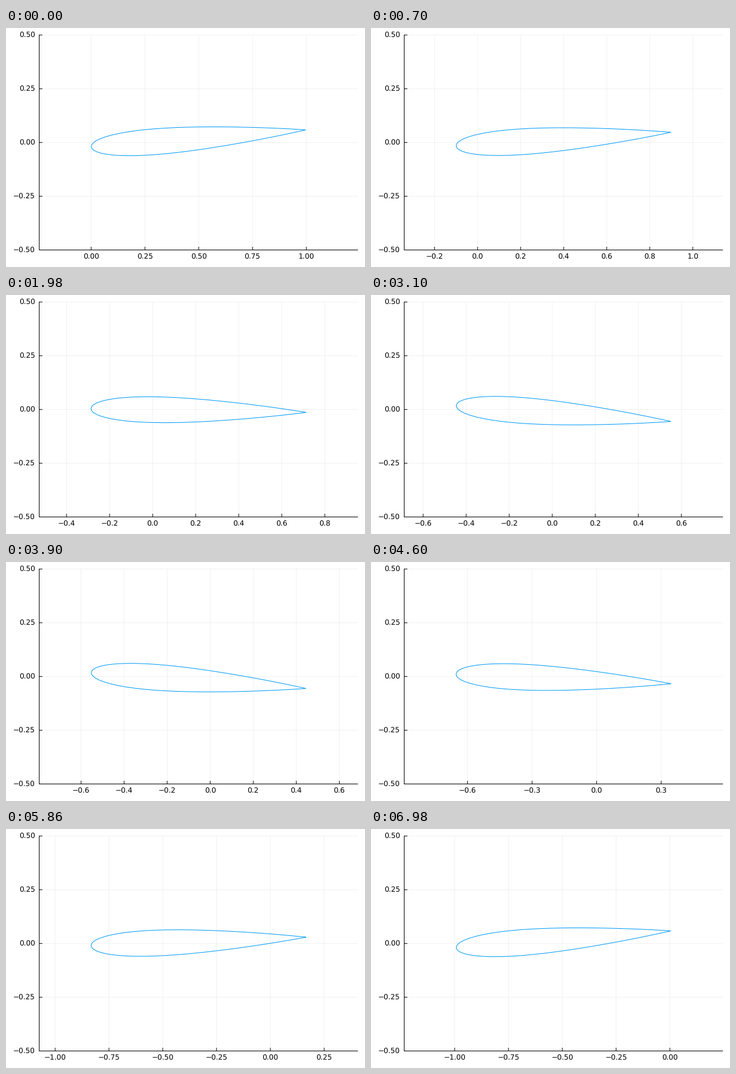
These frames come from a looping animation (600x400 px, 7080 ms). A matplotlib script:

```python
import numpy as np
import matplotlib.pyplot as plt
from matplotlib.animation import FuncAnimation

plt.rcParams["font.family"] = "DejaVu Sans"
plt.rcParams["text.hinting"] = "none"

W, H, DPI = 600, 400, 100
PX = 72 / DPI                                   # one pixel in points
LEFT, RIGHT, TOP, BOTTOM = 55.5, 588.2, 11.8, 371.5
SCALE = BOTTOM - TOP                            # pixels per unit, both axes
MID_X, MID_Y = (LEFT + RIGHT) / 2, (TOP + BOTTOM) / 2
SPAN = (RIGHT - LEFT) / SCALE
TICK = 5.3
FONT = 12 * PX

POSES = 150
PITCH = np.radians(4.5)
PIVOT = 0.25
STEPS = {0.2: (0.7, 1), 0.25: (0.5, 2), 0.3: (0.2, 1)}   # niceness, decimals


def foil(n=30, thick=0.12):
    """Closed symmetric four-digit section with unit chord."""
    x = (1 - np.cos(np.linspace(0, np.pi, n + 1))) / 2
    y = 5 * thick * (0.2969 * np.sqrt(x) - 0.1260 * x - 0.3516 * x**2
                     + 0.2843 * x**3 - 0.1036 * x**4)
    return np.r_[x[::-1], x[1:]], np.r_[y[::-1], -y[1:]]


def ticks_for(lo, hi):
    """Best-scoring round ticks inside the limits, with their decimals."""
    best = None
    for step, (nice, digits) in STEPS.items():
        vals = step * np.arange(np.ceil(lo / step), np.floor(hi / step) + 1)
        n = len(vals)
        if not 4 <= n <= 8:
            continue
        score = ((1 - abs(n - 5) / 5) / 4 + nice / 4
                 + 0.5 * (hi - lo) / ((n - 1) * step))
        if best is None or score > best[0]:
            best = score, vals, digits
    return best[1:]


def label(v, digits):
    text = f"{abs(v):.{digits}f}"
    return "\u2212" + text if v < -1e-9 else text


def line(xs, ys, color="black", **kw):
    kw = {"lw": PX, "solid_capstyle": "butt", "snap": False, **kw}
    return ax.plot(xs, ys, color=color, **kw)[0]


def grid_line(xs, ys):
    return line(xs, ys, alpha=0.055, zorder=1)


fig = plt.figure(figsize=(W / DPI, H / DPI), dpi=DPI, facecolor="white")
ax = fig.add_axes([0, 0, 1, 1])
ax.set_xlim(0, W)
ax.set_ylim(H, 0)
ax.axis("off")

# fixed vertical axis
for v in np.linspace(-0.5, 0.5, 5):
    y = MID_Y - v * SCALE
    grid_line([LEFT, RIGHT], [y, y])
    line([LEFT, LEFT + TICK], [y, y], zorder=4)
    ax.text(48.5, y + 4.1, label(v, 2), ha="right", va="baseline", size=FONT)
line([LEFT, LEFT], [TOP, BOTTOM], zorder=4, solid_capstyle="projecting")
line([LEFT, RIGHT], [BOTTOM, BOTTOM], zorder=4)

# reusable marks for the scrolling horizontal axis
marks = [(grid_line([0, 0], [TOP, BOTTOM]),
          line([0, 0], [BOTTOM - TICK, BOTTOM], zorder=4),
          ax.text(0, 387, "", ha="center", va="baseline", size=FONT))
         for _ in range(8)]

FX, FY = foil()
wing = line([], [], color="#009AF9", zorder=3, solid_joinstyle="miter")


def pose_at(i):
    """Poses come in threes that hold for 20, 100 and 20 ms."""
    group, part = divmod(i, 7)
    return min(3 * group + (part > 0) + (part > 5), POSES - 1)


def update(i):
    phase = pose_at(i) / POSES
    a = PITCH * np.cos(2 * np.pi * phase)
    dx = FX - PIVOT
    x = PIVOT + dx * np.cos(a) - FY * np.sin(a) - phase
    y = dx * np.sin(a) + FY * np.cos(a)
    mid = (x.min() + x.max()) / 2
    wing.set_data(MID_X + (x - mid) * SCALE, MID_Y - y * SCALE)

    vals, digits = ticks_for(mid - SPAN / 2, mid + SPAN / 2)
    for j, (grid, tick, text) in enumerate(marks):
        shown = j < len(vals)
        for part in (grid, tick, text):
            part.set_visible(shown)
        if shown:
            px = MID_X + (vals[j] - mid) * SCALE
            grid.set_xdata([px, px])
            tick.set_xdata([px, px])
            text.set_x(px)
            text.set_text(label(vals[j], digits))
    return [wing]


anim = FuncAnimation(fig, update, frames=354, interval=20, repeat=True,
                     repeat_delay=0, blit=False)
plt.show()
```
